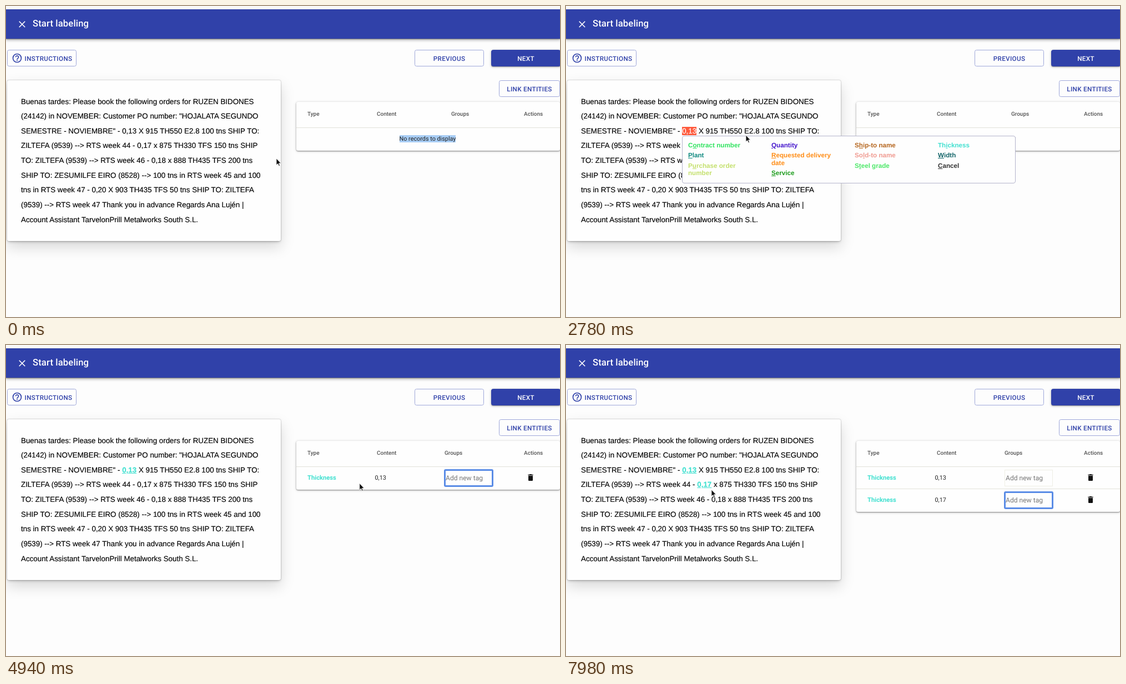
These frames come from a looping animation (998 px wide and 561 px high, 8000 ms). An HTML page:

```html
<!DOCTYPE html>
<html lang="en">
<head>
<meta charset="utf-8">
<title>Start labeling</title>
<style>
  html, body { margin: 0; width: 100%; height: 100%; overflow: hidden; background: #fdfdfd; }
  #stage { position: relative; width: 998px; height: 561px; overflow: hidden;
    font: 10.84px Roboto, sans-serif; color: #222; text-rendering: geometricPrecision; }
  #stage div, #stage svg { position: absolute; box-sizing: border-box; white-space: pre; }
  svg { overflow: visible; }

  .bar { left: 0; top: 6px; width: 998px; height: 53px; background: #3041a9;
    box-shadow: 0 1px 1px #0005, 0 3px 4px #0003, 0 1px 8px #0002; }
  .title { left: 48px; top: 0; line-height: 54px; color: #fff;
    font-size: 16.66px; font-weight: 500; letter-spacing: .0075em; }
  .button { height: 30px; line-height: 30px; border: 1px solid #9fa8da; border-radius: 3.5px;
    color: #3041a9; font-size: 11.66px; font-weight: 500; letter-spacing: .02857em; text-align: center; }
  .solid { background: #3041a9; border-color: #3041a9; color: #fff;
    box-shadow: 0 1px 1px #0004, 0 1px 4px #0004; }

  .card { left: 2px; top: 134px; width: 492.5px; height: 290px; background: #fefefe; border-radius: 3px;
    box-shadow: 0 0 2px #0006, 0 3px 5px -2px #0004, 0 11px 26px #00000026; }
  .letter { left: 25px; top: 25.5px; font: 13.36px/26.65px "Liberation Sans", Arial, sans-serif; color: #000;
    -webkit-text-stroke: .15px; }
  .marked { background: #ff5a3c; color: #fff; }
  .labeled { color: #40e0d0; font-weight: bold; text-decoration: underline; }

  .table { left: 523px; top: 173px; width: 475px; background: #fefefe; border-radius: 3px;
    box-shadow: 0 1px 2px #0006, 0 1px 5px #0003; }
  .table div { line-height: 16px; }
  .head { font-size: 10px; font-weight: 500; color: #555; top: 15px; }
  #stage .row { left: 0; width: 475px; height: 40px; border-top: 1px solid #e2e2da; }
  .row > div { top: 11.5px; }
  .row > svg { top: 11px; }
  .type { left: 20px; font-size: 11.2px; font-weight: 700; color: #40e0d0; }
  #stage .input { left: 267px; top: 5px; width: 87px; height: 29.5px; line-height: 29px; padding-left: 1px;
    border: 1px solid #eeeee4; font-size: 12.1px; color: #757575; }
  #stage .focus { left: 266px; top: 4px; width: 89px; height: 32px; border: 3px solid #5a8ce6;
    border-radius: 3px; line-height: 27px; padding-left: 0; }
  .selected { background: #a8cdf5; }

  .menu { width: 601px; height: 86px; background: #fefefe; border: 1px solid #b4b4cc; border-radius: 4px;
    font: bold 11.66px/13.4px "Liberation Sans", Arial, sans-serif; }
  .menu p { margin: 0 0 5px; }
</style>
</head>
<body>
<div id="stage">
  <div class="bar">
    <svg style="left:18.5px;top:17px" width="20" height="20" viewBox="0 0 24 24">
      <path d="M5.7 5.7 18.3 18.3M18.3 5.7 5.7 18.3" stroke="#fff" stroke-width="2"/></svg>
    <div class="title">Start labeling</div>
  </div>
  <div class="button" style="left:2px;top:79px;width:125px;padding-left:24px">INSTRUCTIONS</div>
  <svg style="left:10px;top:84px" width="20" height="20" viewBox="0 0 24 24" fill="none" stroke="#3041a9" stroke-width="2">
    <circle cx="12" cy="12" r="9"/><path d="M9 10a3 3 0 1 1 4.700 2.400Q12 13.500 12 15M12 16v2"/></svg>
  <div class="button" style="left:736px;top:79px;width:125px">PREVIOUS</div>
  <div class="button solid" style="left:874px;top:79px;width:125px">NEXT</div>
  <div class="button" style="left:888px;top:134px;width:110px">LINK ENTITIES</div>

  <div class="card"><div class="letter">Buenas tardes: Please book the following orders for RUZEN BIDONES
(24142) in NOVEMBER: Customer PO number: "HOJALATA SEGUNDO
SEMESTRE - NOVIEMBRE" - <span class="word">0,13</span> X 915 TH550 E2.8 100 tns SHIP TO:
ZILTEFA (9539) --&gt; RTS week 44 - <span class="word">0,17</span> x 875 TH330 TFS 150 tns SHIP
TO: ZILTEFA (9539) --&gt; RTS week 46 - 0,18 x 888 TH435 TFS 200 tns
SHIP TO: ZESUMILFE EIRO (8528) --&gt; 100 tns in RTS week 45 and 100
tns in RTS week 47 - 0,20 X 903 TH435 TFS 50 tns SHIP TO: ZILTEFA
(9539) --&gt; RTS week 47 Thank you in advance Regards Ana Lujén |
Account Assistant TarvelonPrill Metalworks South S.L.</div></div>

  <div class="table" id="table">
    <div class="head" style="left:20px">Type</div>
    <div class="head" style="left:145px">Content</div>
    <div class="head" id="groups">Groups</div>
    <div class="head" style="left:410px">Actions</div>
    <div class="row" id="empty" style="top:46px"><div style="left:185.5px"><span id="notice">No records to display</span></div></div>
  </div>
  <div class="menu" id="menu"></div>

  <svg id="cursor" style="left:0;top:0" width="1" height="1">
    <path id="arrow" d="M0-1V11L2.800 8.500 4.700 12.800 6.500 12 4.700 7.800H8.300Z" fill="#111" stroke="#fff" stroke-width=".8"/>
    <g id="beam" fill="none"><path d="M-3-6.500Q0-6.500 0-4.500Q0-6.500 3-6.500M0-5V5M-3 6.500Q0 6.500 0 4.500Q0 6.500 3 6.500M-1.500 1.500H1.500" stroke="#fff" stroke-width="2.500"/>
      <path d="M-3-6.500Q0-6.500 0-4.500Q0-6.500 3-6.500M0-5V5M-3 6.500Q0 6.500 0 4.500Q0 6.500 3 6.500M-1.500 1.500H1.500" stroke="#222"/></g>
    <path id="hand" d="M-1 0Q0-1.500 1 0L2 4.500Q3 3.500 4 4.500Q5 3.800 6 5Q8 4.500 8 6.500V9Q8 11 7 13H0.500Q-.5 10.500-3 8Q-3.500 6.500-2 6.500L0 7.500Z" fill="#fff" stroke="#222" stroke-linejoin="round"/>
  </svg>
</div>
<script>
const $ = id => document.getElementById(id);
const words = [...document.querySelectorAll('.word')];
const TRASH = 'M6 19c0 1.1.9 2 2 2h8c1.1 0 2-.9 2-2V7H6v12zM19 4h-3.500l-1-1h-5l-1 1H5v2h14V4z';

// Label, index of the underlined shortcut letter, colour
const columns = [
  [['Contract number', 1, '#2fe35f'], ['Plant', 0, '#108a80'], ['Purchase order\nnumber', 1, '#c4e06c']],
  [['Quantity', 0, '#4314cc'], ['Requested delivery\ndate', 0, '#ff8c14'], ['Service', 0, '#1c9c1c']],
  [['Ship-to name', 1, '#b5651d'], ['Sold-to name', 2, '#f09a90'], ['Steel grade', 1, '#4ce868']],
  [['Thickness', 2, '#40e0d0'], ['Width', 0, '#126468'], ['Cancel', 0, '#333']],
];
$('menu').innerHTML = columns.map((items, i) =>
  `<div style="left:${10.5 + 150 * i}px;top:10.5px">` + items.map(([name, k, color]) =>
    `<p style="color:${color}">${name.slice(0, k)}<u>${name[k]}</u>${name.slice(k + 1)}</p>`).join('') +
  '</div>').join('');

const rows = words.map((word, i) => {
  const row = document.createElement('div');
  row.className = 'row';
  row.style.top = 46 + 40 * i + 'px';
  row.innerHTML = `<div class="type">Thickness</div><div style="left:141.5px">${word.textContent}</div>
    <div class="input">Add new tag</div>
    <svg style="left:413.500px" width="16" height="16" viewBox="0 0 24 24"><path d="${TRASH}" fill="#111"/></svg>`
    .replace(/>\s+</g, '><');
  $('table').append(row);
  return row;
});

const LOOP = 8000, DESELECT = 1560;
// Each word: drag start and end, menu opening, label applied, menu position
const labels = [
  { from: 1800, to: 2250, open: 2350, done: 4560, x: 208.5, y: 233.5 },
  { from: 5950, to: 6450, open: 6560, done: 7580, x: 237, y: 260.2 },
];
const path = [
  [0, 487, 276], [250, 487, 276], [1500, 209, 226], [1800, 209, 226], [2250, 235, 226], [2450, 236, 226],
  [2780, 324, 234], [3700, 722, 250], [4700, 722, 250], [5600, 240, 253], [5950, 238, 253],
  [6450, 263, 253], [7560, 262, 253], [7760, 262, 262], [LOOP, 262, 262],
];
const shapes = [[0, 'arrow'], [520, 'beam'], [2350, 'hand'], [2520, 'arrow'], [3560, 'hand'],
  [4560, 'arrow'], [5130, 'beam'], [6560, 'hand'], [7660, 'arrow']];

const clamp = v => Math.min(1, Math.max(0, v));
const show = (el, on) => el.style.display = on ? '' : 'none';

function cursorAt(t) {
  const i = path.findIndex(p => p[0] > t);
  const [t0, x0, y0] = path[i - 1], [t1, x1, y1] = path[i];
  const k = (t - t0) / (t1 - t0), e = k * k * (3 - 2 * k);
  return [x0 + (x1 - x0) * e, y0 + (y1 - y0) * e];
}

function draw(t) {
  const count = labels.filter(l => t >= l.done).length;
  const active = labels.find(l => t >= l.open && t < l.done);

  labels.forEach((l, i) => {
    const dragging = t >= l.from && t < l.open;
    const drag = clamp((t - l.from) / (l.to - l.from)) * 100;
    words[i].className = t >= l.done ? 'labeled' : t >= l.open ? 'marked' : '';
    words[i].style.background = dragging ? `linear-gradient(90deg, #a8cdf5 ${drag}%, transparent 0)` : '';
    show(rows[i], i < count);
    const focused = i === count - 1 && !(labels[i + 1] && t >= labels[i + 1].from);
    rows[i].querySelector('.input').classList.toggle('focus', focused);
  });

  show($('empty'), !count);
  $('notice').className = t < DESELECT ? 'selected' : '';
  $('groups').style.left = (count ? 267 : 279) + 'px';
  $('table').style.height = 48 + 40 * Math.max(1, count) + 'px';

  show($('menu'), active);
  if (active) {
    $('menu').style.left = active.x + 'px';
    $('menu').style.top = active.y + 'px';
  }

  const [x, y] = cursorAt(t);
  const shape = shapes.filter(s => s[0] <= t).pop()[1];
  $('cursor').style.transform = `translate(${x}px, ${y}px)`;
  for (const id of ['arrow', 'beam', 'hand']) show($(id), id === shape);
}

const start = performance.now();
function tick() {
  draw((performance.now() - start) % LOOP);
  requestAnimationFrame(tick);
}
tick();
</script>
</body>
</html>
```
